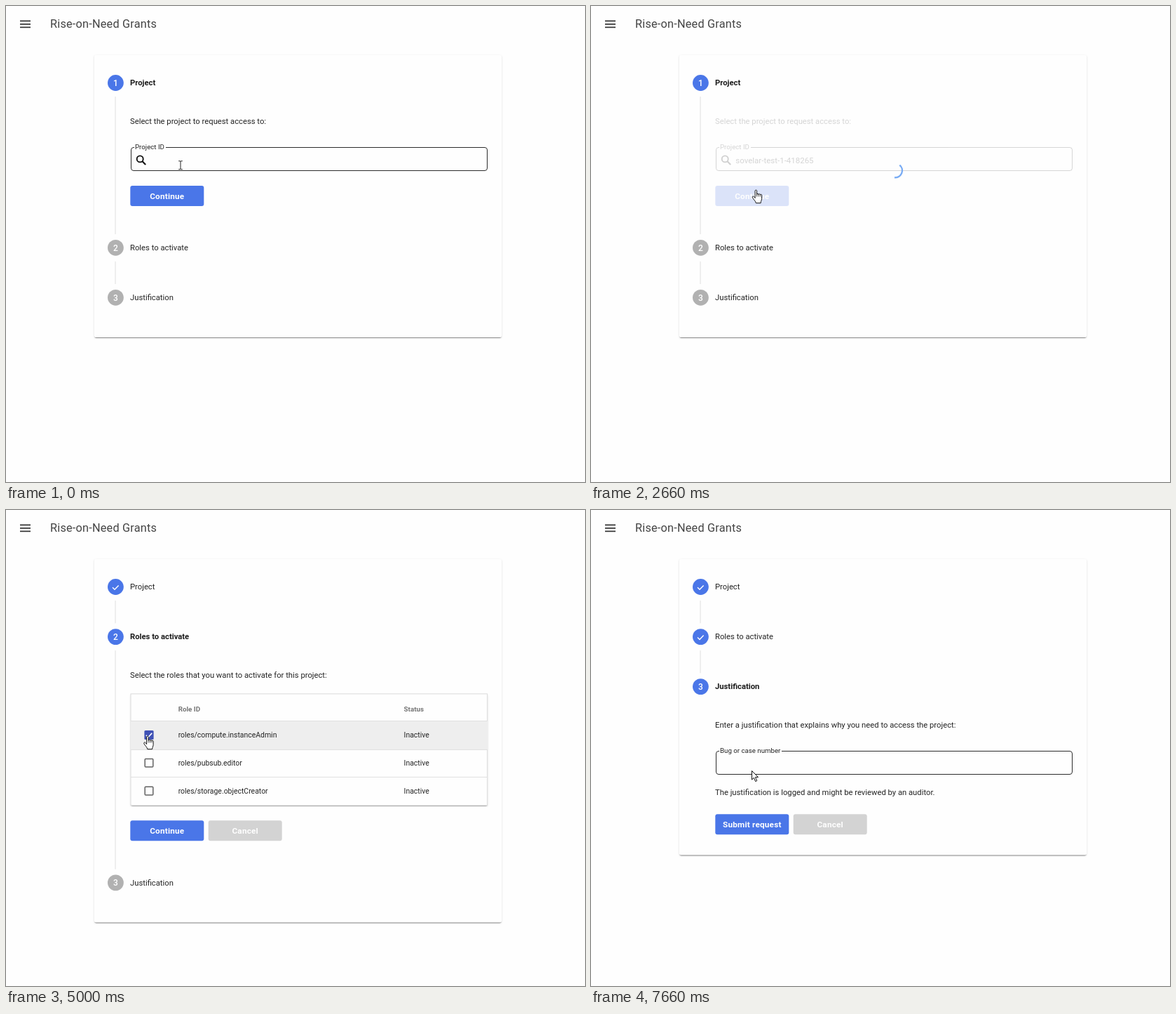
Animation of 826x678 px, one loop 8000 ms. Source, as an HTML page:

```html
<!DOCTYPE html>
<html lang="en">
<head>
<meta charset="utf-8">
<title>Access request</title>
<style>
html, body { margin: 0; width: 100%; height: 100%; overflow: hidden; background: #fefefe; }
svg { display: block; width: 826px; height: 678px; font-family: Roboto, sans-serif; }
.title { font-size: 16.3px; letter-spacing: .0125em; fill: #444; }
.body { font-size: 11.25px; fill: #242424; }
.active { font-size: 11.25px; font-weight: 700; fill: #1c1c1c; }
.input { font-size: 11.5px; fill: #242424; }
.legend { font-size: 9.7px; fill: #242424; }
.cell { font-size: 10.45px; fill: #242424; }
.head { font-size: 9.8px; font-weight: 700; fill: #757575; }
.btn { font-size: 11.75px; font-weight: 700; letter-spacing: .0178em; fill: #fefefe; text-anchor: middle; }
.num { font-size: 12px; font-weight: 500; fill: #fff; text-anchor: middle; }
</style>
</head>
<body>
<svg id="stage" viewBox="0 0 826 678"></svg>
<script>
const LOOP = 8000;
const BLUE = '#4a76e8', GREY = '#b1b1b1', PAPER = '#fefefe';
const PICK = 'sovelar-test-1-418265';
const OPTIONS = ['simsovelar-demo-3', 'simsovelar-demo-2', PICK, 'simsovelar-demo-1'];
const ROLES = ['roles/compute.instanceAdmin', 'roles/pubsub.editor', 'roles/storage.objectCreator'];

// Each entry changes only the listed properties from its time on.
const TIMELINE = [
  [0, { step: 1, fade: 1, typed: '', cursor: 'beam', x: 249, y: 220.5 }],
  [330, { typed: 's', caret: 212.5 }],
  [660, { typed: 'sovel', caret: 233.5, squiggle: true }],
  [1000, { caret: 0, list: true, hover: 0, cursor: 'hand', x: 253, y: 239 }],
  [1330, { hover: 2, x: 260.5, y: 286.5 }],
  [1660, { list: false, squiggle: false, typed: PICK, caret: 316.5, cursor: 'arrow', x: 266.5, y: 287.5 }],
  [2000, { caret: 0, cursor: 'hand', x: 229.5, y: 261.5 }],
  [2660, { fade: .19, spin: true }],
  [3000, { step: 2, fade: .35, spin: false, cursor: 'arrow', x: 235.5, y: 262 }],
  [3330, { fade: .92 }],
  [3660, { fade: 1 }],
  [4000, { rowHover: true, cursor: 'hand', x: 194.5, y: 324 }],
  [4330, { x: 196, y: 321.5 }],
  [4660, { checked: true, ripple: .2 }],
  [5000, { ripple: 0 }],
  [5330, { rowHover: false, cursor: 'arrow', x: 222.5, y: 432 }],
  [5660, { cursor: 'hand', x: 230, y: 453 }],
  [6330, { step: 3, fade: .5 }],
  [6660, { fade: 1 }],
  [7330, { cursor: 'arrow', x: 235.5, y: 414.5 }],
  [7660, { x: 229.5, y: 371.5 }]
];

const text = (x, y, str, cls) => `<text x="${x}" y="${y}" class="${cls}">${str}</text>`;
const rect = (x, y, w, h, fill, extra = '') =>
  `<rect x="${x}" y="${y}" width="${w}" height="${h}" fill="${fill}" ${extra}/>`;
const path = (d, stroke, width, fill = 'none', extra = '') =>
  `<path d="${d}" stroke="${stroke}" stroke-width="${width}" fill="${fill}" ${extra}/>`;
const group = (opacity, inner) => `<g opacity="${opacity}">${inner}</g>`;

function sheet(x, y, w, h) {
  const shade = (dy, blur, inset, a) =>
    rect(x + inset, y + dy + inset, w - 2 * inset, h - 2 * inset, '#000',
      `rx="2" opacity="${a}" style="filter:blur(${blur}px)"`);
  return shade(2, .5, 1, .26) + shade(1, .5, 0, .16) + shade(1, 1.4, 0, .13) +
    rect(x, y, w, h, PAPER, 'rx="2"');
}

function button(x, y, label, fill) {
  return rect(x, y, 105, 29, fill, 'rx="3"') + text(x + 52.5, y + 18.6, label, 'btn');
}

function field(y, legend, notch) {
  const d = `M${notch} ${y}H683a3.5 3.5 0 0 1 3.5 3.5v26a3.5 3.5 0 0 1 -3.5 3.5H182` +
    `a3.5 3.5 0 0 1 -3.5 -3.5v-26a3.5 3.5 0 0 1 3.5 -3.5H183`;
  return path(d, '#2c2c2c', 1) + text(184, y + 2.8, legend, 'legend');
}

function badge(n, y, step, label) {
  const mark = n < step
    ? path(`M152 ${y + .8}l3 3 5.6 -5.8`, '#fff', 1.4)
    : text(156.4, y + 4.4, n, 'num');
  return `<circle cx="156.4" cy="${y}" r="11.4" fill="${n > step ? GREY : BLUE}"/>` + mark +
    text(177, y + 3.7, label, n === step ? 'active' : 'body');
}

const rail = (y1, y2) => rect(155.5, y1, 1, y2 - y1, '#dedede');

function stepper(s) {
  const ys = [[109.5, 344.3, 415.3], [109.5, 180.6, 530.9], [109.5, 180.6, 251.6]][s.step - 1];
  const names = ['Project', 'Roles to activate', 'Justification'];
  const bottom = [472, 587.5, 491.5][s.step - 1];
  return sheet(126, 70, 581, bottom - 70) +
    rail(ys[0] + 19.5, ys[1] - 19.3) + rail(ys[1] + 19.5, ys[2] - 19.3) +
    names.map((n, i) => badge(i + 1, ys[i], s.step, n)).join('');
}

function squiggle(x1, x2, y) {
  let d = `M${x1} ${y}`;
  for (let x = x1, up = 1; x < x2; x += 1.7, up = -up) d += `l1.7 ${-1.3 * up}`;
  return path(d, '#d8493c', .8);
}

function projectForm(s) {
  const lens = '<circle cx="191.2" cy="217.9" r="4.5" fill="none" stroke="#111" stroke-width="1.9"/>' +
    path('M194.5 221.2L199.2 226', '#111', 2.1);
  return text(177, 167.8, 'Select the project to request access to:', 'body') +
    field(201.5, 'Project ID', 228) + lens +
    text(206.3, 223.7, s.typed, 'input') +
    (s.squiggle ? squiggle(207, 232, 226) : '') +
    (s.caret ? rect(s.caret - .5, 213, 1, 13, '#222') : '') +
    button(177.3, 256, 'Continue', BLUE);
}

function optionList(s) {
  return sheet(179, 235.5, 475, 96) +
    rect(179, 236 + 23.7 * s.hover, 475, 23.7, '#efefef') +
    OPTIONS.map((o, i) => text(182.7, 251 + 23.8 * i, o, 'body')).join('');
}

function checkbox(y, on) {
  return on
    ? rect(197.4, y - 6.6, 13.2, 13.2, '#3f51b5', 'rx="1.5"') +
      path(`M199.8 ${y + .2}l3 3 5.4 -5.8`, '#fff', 1.6)
    : rect(198.2, y - 5.8, 11.6, 11.6, 'none', 'rx="1" stroke="#636363" stroke-width="1.5"');
}

function rolesForm(s) {
  const line = y => rect(178, y, 509, 1, '#e0e0e0');
  const rows = ROLES.map((r, i) => {
    const y = 320.5 + 39.8 * i;
    return checkbox(y, i === 0 && s.checked) +
      text(245.7, y + 3.6, r, 'cell') + text(567.6, y + 3.6, 'Inactive', 'cell');
  }).join('');
  return text(177, 238.8, 'Select the roles that you want to activate for this project:', 'body') +
    sheet(178, 262, 509, 159) +
    rect(178, 261.9, 508.6, 159, 'none', 'stroke="#dcdcdc"') +
    (s.rowHover ? rect(178, 301, 509, 40, '#eee') : '') +
    line(300) + line(341) + line(380) +
    text(245.7, 287.4, 'Role ID', 'head') + text(567.6, 287.4, 'Status', 'head') +
    (s.ripple ? `<circle cx="204.3" cy="320.5" r="14" fill="#3f51b5" opacity="${s.ripple}"/>` : '') +
    rows + button(177.3, 442.3, 'Continue', BLUE) + button(288.7, 442.3, 'Cancel', '#d3d3d3');
}

function reasonForm() {
  return text(177, 310, 'Enter a justification that explains why you need to access the project:', 'body') +
    field(343.5, 'Bug or case number', 272) +
    text(177, 406, 'The justification is logged and might be reviewed by an auditor.', 'body') +
    button(177.3, 433.3, 'Submit request', BLUE) + button(288.7, 433.3, 'Cancel', '#d3d3d3');
}

const CURSORS = {
  beam: path('M-2.8 .3H-.8Q0 .3 0 1.2V11.2Q0 12.2 -.8 12.2H-2.8M2.8 .3H.8Q0 .3 0 1.2M0 11.2Q0 12.2 .8 12.2H2.8',
    '#222', 1),
  arrow: path('M0 0V12.6l2.9 -2.7 2.2 5.2 2.1 -.9 -2.2 -5.1h4z', '#111', 1, '#fff'),
  hand: path('M4.6 12V1.9a1.25 1.25 0 0 1 2.5 0V7a1.2 1.2 0 0 1 2.4 .2a1.2 1.2 0 0 1 2.4 .5' +
    'a1.1 1.1 0 0 1 2.2 .6V13c0 2.2 -1.4 3 -1.5 6.2H5.8c0 -2.6 -4 -5.4 -5 -8.1c-.5 -1.6 1.3 -2.2 2.3 -.9z',
    '#111', 1, '#fff', 'stroke-linejoin="round"') +
    path('M7.1 7V10M9.5 7.2V10M11.9 7.7V10', '#111', .8)
};

const header = [20.5, 25, 29.5].map(y => rect(20, y, 15, 1.7, '#333')).join('') +
  text(63, 31.4, 'Rise-on-Need Grants', 'title');

function scene(s) {
  const form = [projectForm, rolesForm, reasonForm][s.step - 1](s);
  return rect(0, 0, 826, 678, PAPER) + header + stepper(s) + group(s.fade, form) +
    (s.list ? optionList(s) : '') +
    (s.spin ? path('M440.3 226.6A10 10 0 0 1 433 244.3', '#78abf4', 2.4) : '') +
    `<g transform="translate(${s.x} ${s.y})">${CURSORS[s.cursor]}</g>`;
}

const stage = document.getElementById('stage');
let shown = -1;

function draw(ms) {
  const t = ms % LOOP;
  const count = TIMELINE.filter(([at]) => at <= t).length;
  if (count === shown) return;
  shown = count;
  const state = Object.assign({}, ...TIMELINE.slice(0, count).map(e => e[1]));
  stage.innerHTML = scene(state);
}

const start = performance.now();
function tick() {
  draw(performance.now() - start);
  requestAnimationFrame(tick);
}
tick();
</script>
</body>
</html>
```
